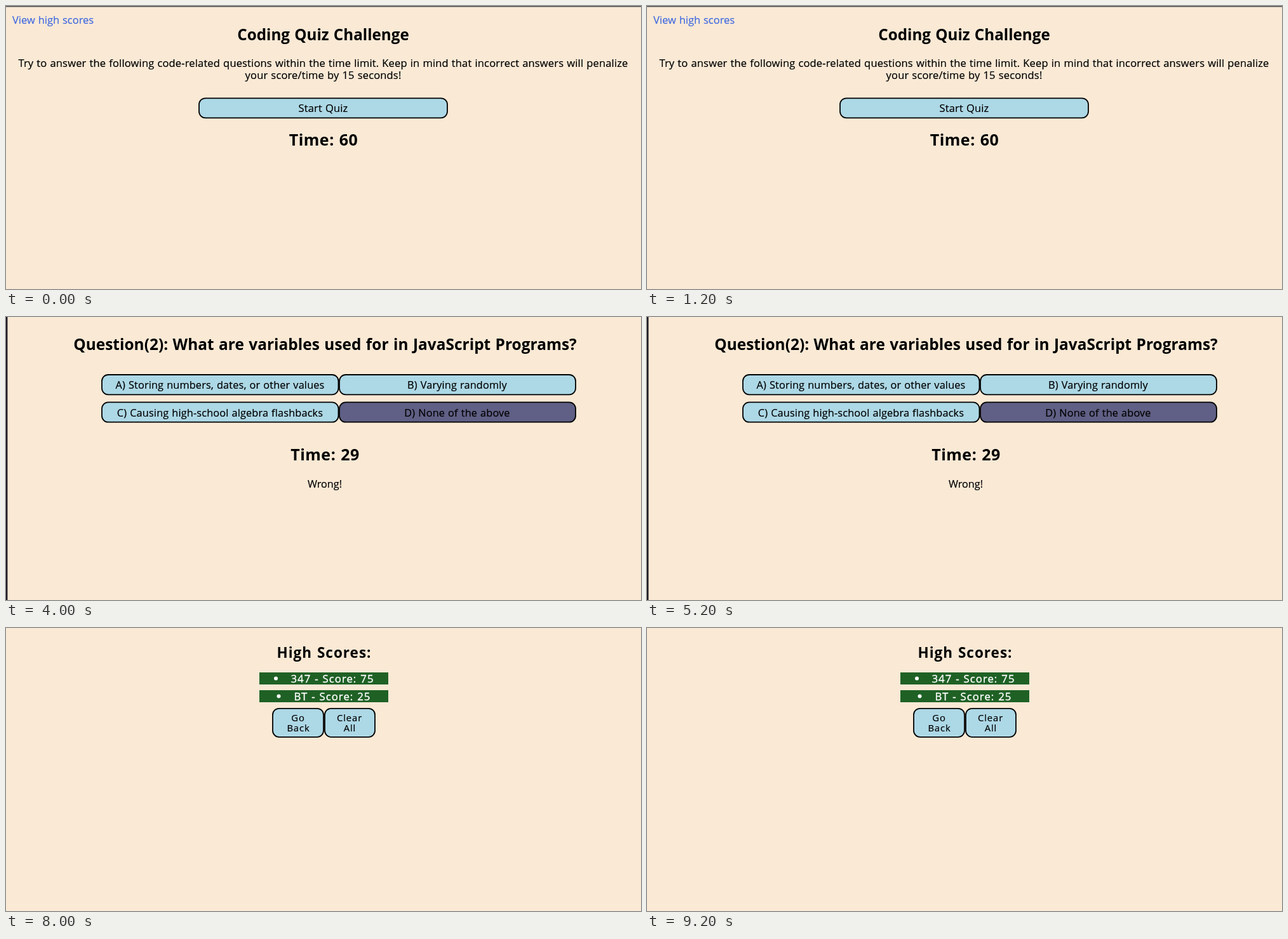
An HTML page for the animation above (10000 ms loop, 1000 by 446 pixels).

```html
<!DOCTYPE html>
<html lang="en">
<head>
<meta charset="utf-8">
<title>Coding Quiz</title>
<style>
  html, body { margin: 0; width: 100%; height: 100%; overflow: hidden; background: #f9e9d5; }
  svg { display: block; width: 100vw; height: 100vh; font: 16.5px "Open Sans", "Noto Sans", sans-serif; word-spacing: .6px; }
  text { text-anchor: middle; stroke: #000; stroke-width: .2; }
  .big { font-weight: 700; word-spacing: 1px; stroke: none; }
  .time { font-size: 25px; letter-spacing: .5px; }
  .link { text-anchor: start; fill: #4169e1; stroke: #4169e1; }
  .btn { fill: #add8e6; stroke: #000; stroke-width: 1.8; }
  .hover { fill: #605f85; }
  .field { fill: #fff; stroke: #111; stroke-width: 1.8; }
  .row { fill: #1f6125; }
  .item { fill: #fff; font-size: 16.8px; letter-spacing: 1px; }
  .item text { stroke: #fff; stroke-width: .4; }

  .scene { visibility: hidden; animation: show 10s step-end calc(var(--i) * 2s - 10s) infinite; }
  @keyframes show {
    0% { visibility: visible; }
    20%, 100% { visibility: hidden; }
  }
</style>
</head>
<body>
<svg viewBox="0 0 1000 446" preserveAspectRatio="none">
  <!-- Start -->
  <g class="scene" style="--i:0">
    <rect width="1000" height="1.5" fill="#4b5054"/>
    <text class="link" x="10" y="28">View high scores</text>
    <text class="big" x="499.5" y="54" font-size="24.2">Coding Quiz Challenge</text>
    <g letter-spacing=".16">
      <text x="499.5" y="96">Try to answer the following code-related questions within the time limit. Keep in mind that incorrect answers will penalize</text>
      <text x="499.5" y="115">your score/time by 15 seconds!</text>
    </g>
    <rect class="btn" x="304" y="145.3" width="391" height="31" rx="10"/>
    <text x="499.5" y="167" letter-spacing=".15">Start Quiz</text>
    <text class="big time" x="500" y="220">Time: 60</text>
  </g>

  <!-- Question 1 -->
  <g class="scene" style="--i:1">
    <rect width="1000" height="1" fill="#6c6e6e"/>
    <text class="big" x="502" y="57" font-size="25" letter-spacing="-.13">Question(1): Which of the following are capabilities of functions in JavaScript?</text>
    <g class="btn">
      <rect x="157" y="98" width="366" height="33" rx="10"/>
      <rect x="525" y="98" width="365" height="33" rx="10"/>
      <rect x="157" y="144" width="366" height="33" rx="10"/>
      <rect x="525" y="144" width="365" height="33" rx="10"/>
    </g>
    <g font-size="16.6" letter-spacing=".1">
      <text x="340" y="121">A) Return a value</text>
      <text x="707.5" y="121">B) Accept parameters</text>
      <text x="340" y="167">C) Accept parameters and Return a value</text>
      <text x="707.5" y="167">D) All of the above</text>
    </g>
    <text class="big time" x="502" y="241">Time: 58</text>
  </g>

  <!-- Question 2 -->
  <g class="scene" style="--i:2">
    <rect width="2.4" height="446" fill="#1c1a22"/>
    <text class="big" x="502.5" y="52" font-size="24.4" letter-spacing=".04">Question(2): What are variables used for in JavaScript Programs?</text>
    <g class="btn">
      <rect x="151" y="91" width="372.5" height="31.3" rx="10"/>
      <rect x="525" y="91" width="372" height="31.3" rx="10"/>
      <rect x="151" y="134.4" width="372.5" height="31.3" rx="10"/>
      <rect class="hover" x="525" y="134.4" width="372" height="31.3" rx="10"/>
    </g>
    <g font-size="16.3" letter-spacing=".15">
      <text x="337" y="113">A) Storing numbers, dates, or other values</text>
      <text x="710.5" y="113">B) Varying randomly</text>
      <text x="337" y="157">C) Causing high-school algebra flashbacks</text>
      <text x="710.5" y="157">D) None of the above</text>
    </g>
    <text class="big time" x="502.5" y="226">Time: 29</text>
    <text x="502" y="269" font-size="16.2">Wrong!</text>
  </g>

  <!-- Result -->
  <g class="scene" style="--i:3">
    <path d="M.5 0V446" stroke="#1c1a22" stroke-dasharray="44 2"/>
    <text class="big time" x="500.5" y="52">Time: 11</text>
    <text x="501" y="94" letter-spacing=".16">Well done! your score is: 25</text>
    <rect class="field" x="389" y="149.3" width="224.5" height="20.8" rx="7"/>
    <text x="501" y="165" font-size="13.5">BT</text>
    <rect x="509" y="152" width="1" height="16"/>
    <rect class="btn" x="457" y="182.3" width="89" height="31.3" rx="10"/>
    <text x="501" y="204.5" font-size="16.3">Submit</text>
  </g>

  <!-- Scores -->
  <g class="scene" style="--i:4">
    <text class="big" x="501" y="47" font-size="22.5" letter-spacing="1">High Scores:</text>
    <rect class="row" x="399" y="70" width="203" height="19"/>
    <rect class="row" x="399" y="98" width="203" height="19"/>
    <g class="item">
      <circle cx="425" cy="79.5" r="3"/>
      <text x="514" y="85.5">347 - Score: 75</text>
      <circle cx="429.5" cy="107.5" r="3"/>
      <text x="514" y="113.5">BT - Score: 25</text>
    </g>
    <g class="btn">
      <rect x="420" y="126.8" width="80" height="45" rx="10"/>
      <rect x="502" y="126.8" width="79" height="45" rx="10"/>
    </g>
    <g font-size="14.8" letter-spacing=".9">
      <text x="460" y="147">Go</text>
      <text x="460.5" y="163">Back</text>
      <text x="541" y="147">Clear</text>
      <text x="541.5" y="163">All</text>
    </g>
  </g>
</svg>
</body>
</html>
```
